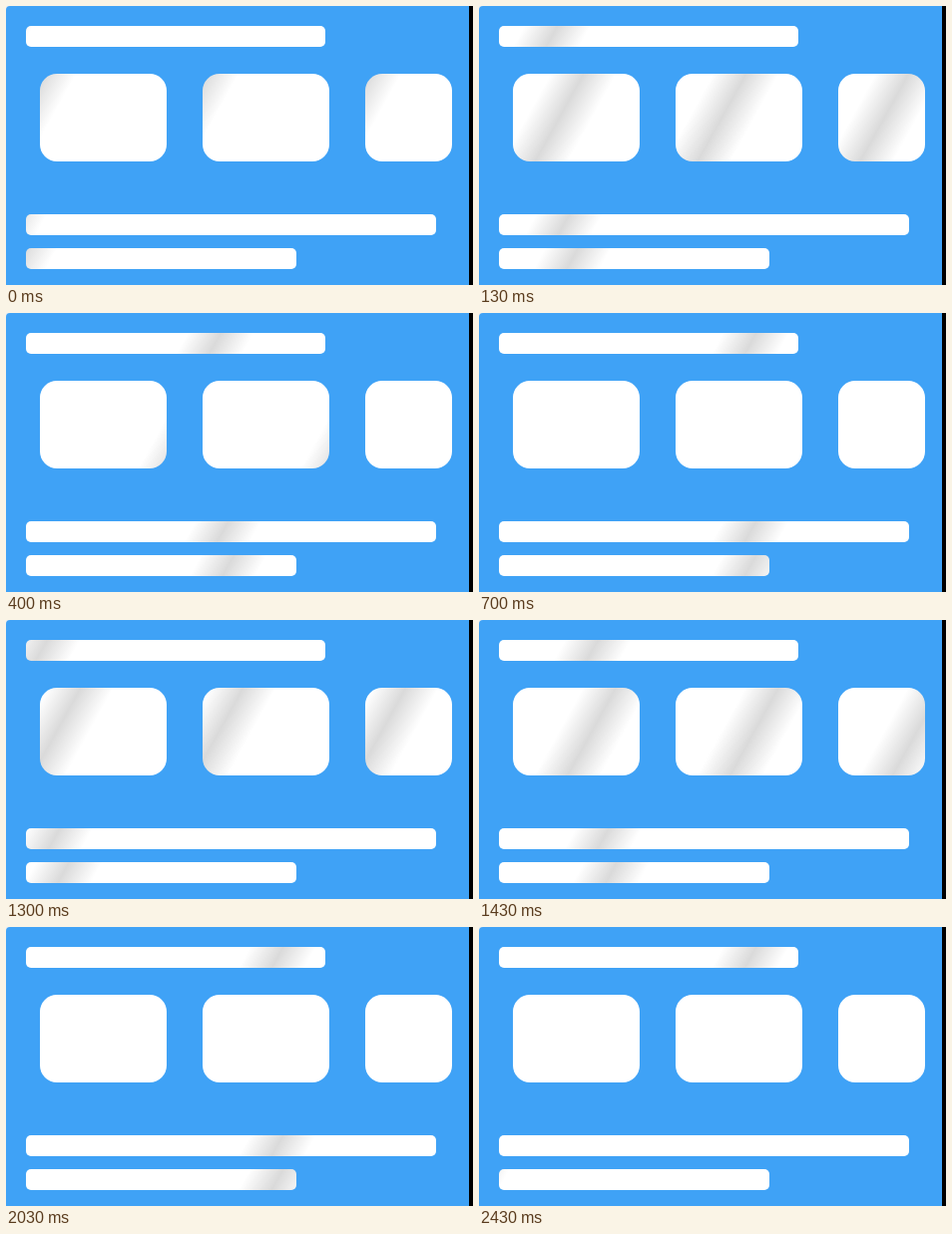
An HTML page with a canvas that plays this animation: 468 px wide and 280 px high, repeating every 2460 ms.

```html
<!DOCTYPE html>
<html>
<head>
<meta charset="utf-8">
<title>Skeleton loader</title>
<style>
html, body { margin: 0; width: 100%; height: 100%; overflow: hidden; background: #3fa2f6; }
canvas { display: block; }
</style>
</head>
<body>
<canvas id="stage" width="468" height="280"></canvas>
<script>
const ctx = document.getElementById('stage').getContext('2d');
const PERIOD = 1230;   // two sweeps per 2460 ms loop
const SWEEP = 700;     // moving part of each period, then the shine rests
const SLANT = 0.55;    // horizontal shift per pixel of height
const HALF_WIDTH = 33;

const bar = (y, w, start) => ({ x: 20, y, w, h: 21, r: 5, start, from: -50, to: 252 });
const card = (x, w) => ({ x, y: 68, w, h: 88, r: 17, start: -20, from: -33, to: 207 });
const shapes = [
  bar(20, 300, -25), card(34, 127), card(197, 127), card(360, 87),
  bar(209, 411, -45), bar(243, 271, -60)
];

// cubic-bezier(0, 0, .58, 1)
function easeOut(u) {
  let lo = 0, hi = 1;
  for (let i = 0; i < 20; i++) {
    const s = (lo + hi) / 2;
    if (1.74 * s * s - 0.74 * s ** 3 < u) lo = s; else hi = s;
  }
  return 3 * lo * lo - 2 * lo ** 3;
}

function shine(s, time) {
  const phase = (time - s.start) % PERIOD;
  const progress = easeOut(Math.min(phase / SWEEP, 1));
  const cx = s.x + s.from + (s.to - s.from) * progress;
  const cy = s.y + s.h / 2;
  const dx = HALF_WIDTH / (1 + SLANT * SLANT), dy = dx * SLANT;
  const g = ctx.createLinearGradient(cx - dx, cy - dy, cx + dx, cy + dy);
  g.addColorStop(0, '#fff');
  g.addColorStop(0.5, '#dadada');
  g.addColorStop(1, '#fff');
  return g;
}

function draw() {
  const time = performance.now() % (2 * PERIOD);
  ctx.fillStyle = '#3fa2f6';
  ctx.fillRect(0, 0, 468, 280);
  ctx.fillStyle = '#000';
  ctx.fillRect(464, 0, 4, 280);
  ctx.fillStyle = '#e8eef4';
  ctx.beginPath();
  ctx.moveTo(0, 0);
  ctx.lineTo(4, 0);
  ctx.quadraticCurveTo(0, 0, 0, 4);
  ctx.fill();
  for (const s of shapes) {
    ctx.fillStyle = shine(s, time);
    ctx.beginPath();
    ctx.roundRect(s.x, s.y, s.w, s.h, s.r);
    ctx.fill();
  }
  requestAnimationFrame(draw);
}
draw();
</script>
</body>
</html>
```
